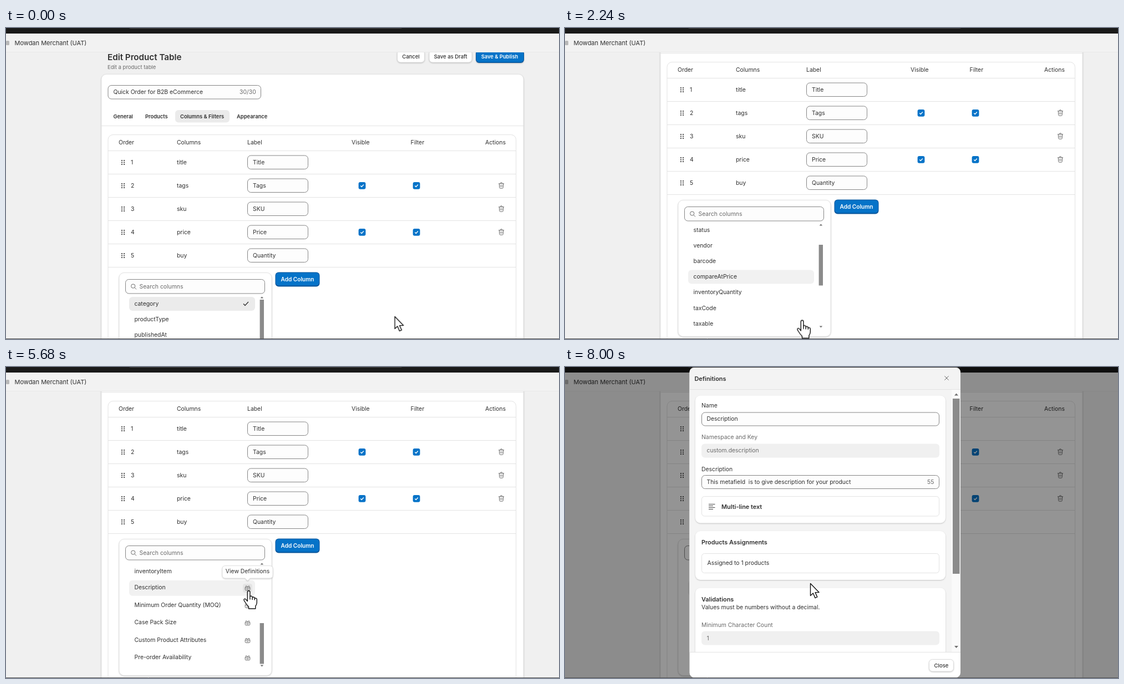
An HTML page that plays this animation: 997x561 px, repeating every 8080 ms.

```html
<!DOCTYPE html>
<html lang="en">
<head>
<meta charset="utf-8">
<title>Edit Product Table</title>
<style>
html, body { margin: 0; width: 100%; height: 100%; overflow: hidden; background: #f0f0f0; }
svg { display: block; width: 997px; height: 561px; }
text {
  font: 400 10.4px Inter, "Open Sans", sans-serif;
  fill: #303030; dominant-baseline: central; white-space: pre;
}
.b { font-weight: 600; font-size: 10.9px; }
.t { font-weight: 600; font-size: 9.4px; }
.m { font-weight: 500; font-size: 9.5px; }
.g { fill: #6a6a6a; }
.w { fill: #fff; }
.mid { text-anchor: middle; }
.card { fill: #fff; stroke: #e4e4e4; }
.line { stroke: #e3e3e3; fill: none; }
.field { fill: #fdfdfd; stroke: #858585; }
.off { fill: #f0f0f0; }
.btn { fill: #fff; stroke: #dcdcdc; }
.blue { fill: #0573c8; }
.edge { fill: #07559a; }
.bar { fill: #8b8b8b; }
.icon { fill: none; stroke: #6a6a6a; }
.shadow { filter: drop-shadow(0 1px 1px #0003); }

/* one loop, in 80 ms steps */
#page, #list, #thumb, #cursor, #arrow, #hand, #hover, #hot, #tip, #shade, #modal {
  animation: 8080ms step-end infinite;
}
#page { animation-name: page; }
#list { animation-name: list; }
#thumb { animation-name: thumb; }
#cursor { animation-name: cursor; }
#arrow { animation-name: arrow; }
#hand { animation-name: hand; }
#hover { animation-name: hover; }
#hot { animation-name: hot; }
#tip { animation-name: tip; }
#shade { animation-name: shade; }
#modal { animation-name: modal; }

@keyframes page {
  0% { transform: translateY(131px); }
  .99% { transform: translateY(104px); }
  1.98% { transform: translateY(48px); }
  2.97% { transform: translateY(10px); }
  3.96%, 100% { transform: none; }
}
@keyframes list {
  0% { transform: none; }
  26.73% { transform: translateY(-32px); }
  27.72% { transform: translateY(-86px); }
  28.71% { transform: translateY(-140px); }
  29.7% { transform: translateY(-186px); }
  30.69% { transform: translateY(-224px); }
  31.68% { transform: translateY(-252px); }
  32.67% { transform: translateY(-271px); }
  33.66%, 100% { transform: translateY(-278.7px); }
}
@keyframes thumb {
  0% { transform: none; }
  26.73% { transform: translateY(12px); }
  27.72% { transform: translateY(32px); }
  28.71% { transform: translateY(52px); }
  29.7% { transform: translateY(69px); }
  30.69% { transform: translateY(83px); }
  31.68% { transform: translateY(93px); }
  32.67% { transform: translateY(100px); }
  33.66%, 100% { transform: translateY(103px); }
}
@keyframes cursor {
  0% { transform: translate(700.5px, 520px); }
  14.85% { transform: translate(678px, 521px); }
  15.84% { transform: translate(612px, 522px); }
  16.83% { transform: translate(534px, 524px); }
  17.82% { transform: translate(472px, 525px); }
  18.81% { transform: translate(436px, 526px); }
  19.8% { transform: translate(422px, 526.5px); }
  20.79% { transform: translate(417px, 526.5px); }
  38.61% { transform: translate(417px, 521px); }
  41.58% { transform: translate(417px, 512px); }
  42.57% { transform: translate(418px, 492px); }
  43.56% { transform: translate(419px, 466px); }
  44.55% { transform: translate(420px, 443px); }
  45.54% { transform: translate(421px, 426px); }
  46.53% { transform: translate(421px, 416px); }
  47.52% { transform: translate(421px, 413px); }
  49.5% { transform: translate(421px, 412px); }
  51.48% { transform: translate(422px, 411px); }
  53.46% { transform: translate(423px, 410px); }
  55.44% { transform: translate(424px, 409px); }
  58.41% { transform: translate(424.5px, 408px); }
  64.35% { transform: translate(425px, 406px); }
  69.3% { transform: translate(426px, 404.5px); }
  70.29% { transform: translate(427px, 403px); }
  99%, 100% { transform: translate(442px, 390px); }
}
@keyframes arrow {
  0% { visibility: visible; }
  18.81% { visibility: hidden; }
  99%, 100% { visibility: visible; }
}
@keyframes hand {
  0% { visibility: hidden; }
  18.81% { visibility: visible; }
  99%, 100% { visibility: hidden; }
}
@keyframes hover {
  0% { visibility: hidden; }
  18.81% { visibility: visible; }
  34.65%, 100% { visibility: hidden; }
}
@keyframes hot {
  0% { visibility: hidden; }
  46.53%, 100% { visibility: visible; }
}
@keyframes tip {
  0% { visibility: hidden; }
  55.44%, 100% { visibility: visible; }
}
@keyframes shade {
  0% { opacity: 0; }
  77.22% { opacity: .05; }
  78.21% { opacity: .16; }
  79.2% { opacity: .26; }
  80.19% { opacity: .34; }
  81.18% { opacity: .39; }
  82.17% { opacity: .41; }
  83.16%, 100% { opacity: .42; }
}
@keyframes modal {
  0% { opacity: 0; transform: translateY(200px); }
  77.22% { opacity: .08; transform: translateY(185px); }
  78.21% { opacity: .3; transform: translateY(150px); }
  79.2% { opacity: .56; transform: translateY(112px); }
  80.19% { opacity: .78; transform: translateY(77px); }
  81.18% { opacity: .91; transform: translateY(40px); }
  82.17% { opacity: .98; transform: translateY(12px); }
  83.16%, 100% { opacity: 1; transform: none; }
}
</style>
</head>
<body>
<svg viewBox="0 0 997 561">
  <defs>
    <clipPath id="view"><rect y="44" width="997" height="517"/></clipPath>
    <clipPath id="listView"><rect x="210" y="353" width="262" height="193"/></clipPath>
    <clipPath id="bodyView"><rect x="224" y="41" width="473" height="473"/></clipPath>
    <g id="grip" fill="#4a4a4a">
      <path d="M-3-4.4h2v2h-2zM1-4.4h2v2h-2zM-3-1h2v2h-2zM1-1h2v2h-2zM-3 2.4h2v2h-2zM1 2.4h2v2h-2z"/>
    </g>
    <g id="check">
      <rect class="blue" x="-6.4" y="-6.4" width="12.8" height="12.8" rx="3"/>
      <path d="M-2.8.2l2 2 3.6-4" fill="none" stroke="#fff" stroke-width="1.3"/>
    </g>
    <g id="bin" class="icon">
      <path d="M-5-3.2h10M-1.8-3.4q0-1.9 1.8-1.9t1.8 1.9M-3.7-3l.4 6.6q.1 1.6 1.6 1.6h3.4q1.5 0 1.6-1.6l.4-6.6M-1.2-.8v3.6M1.2-.8v3.6"/>
    </g>
    <g id="meta" class="icon">
      <path d="M-4.3-.8h8.6v3q0 1.6-1.6 1.6h-5.4q-1.6 0-1.6-1.6zM-4.3-.8q0-1.2 1-1.6v-1.4h2v1.2h2.6v-1.2h2v1.4q1 .4 1 1.6M-2 1.5h4"/>
    </g>
  </defs>

  <rect width="997" height="561" fill="#f0f0f0"/>
  <g clip-path="url(#view)">
    <g id="page">
      <text x="183" y="-79" style="font-size:15.2px;font-weight:600">Edit Product Table</text>
      <text class="g" x="183" y="-61" style="font-size:9.5px">Edit a product table</text>
      <g class="shadow">
        <rect class="btn" x="705.5" y="-91" width="49" height="22" rx="6"/>
        <rect class="btn" x="763" y="-91" width="77" height="22" rx="6"/>
        <rect class="edge" x="847" y="-91" width="87" height="23" rx="6"/>
      </g>
      <rect class="blue" x="848" y="-90" width="85" height="20.5" rx="5"/>
      <text class="m mid" x="730" y="-79.5">Cancel</text>
      <text class="m mid" x="801.5" y="-79.5">Save as Draft</text>
      <text class="t w mid" x="890" y="-79.5">Save &amp; Publish</text>

      <rect class="card shadow" x="172" y="-47.5" width="761" height="800" rx="9"/>
      <rect class="field" x="184" y="-27.5" width="275.5" height="24.5" rx="6"/>
      <text x="193.5" y="-16">Quick Order for B2B eCommerce</text>
      <text class="g" x="421" y="-16">30/30</text>
      <rect x="305" y="17" width="98" height="22.5" rx="6" fill="#ebebeb"/>
      <text class="t" x="193.5" y="28">General</text>
      <text class="t" x="251" y="28">Products</text>
      <text class="t" x="314" y="28">Columns &amp; Filters</text>
      <text class="t" x="416" y="28">Appearance</text>
      <path class="line" d="M172 45.5h761"/>
      <rect class="line" x="184" y="61.5" width="735.5" height="700" rx="9"/>
      <g id="rows"></g>

      <rect class="card shadow" x="204" y="310.5" width="275" height="246" rx="9"/>
      <rect class="field" x="215.5" y="322.5" width="251" height="25.5" rx="6"/>
      <g class="icon"><circle cx="229.2" cy="334.6" r="3.6"/><path d="M232 337.4l3 3"/></g>
      <text class="g" x="240.5" y="335">Search columns</text>
      <rect class="edge" x="485.5" y="309.5" width="80" height="26" rx="6"/>
      <rect class="blue" x="486.5" y="310.5" width="78" height="23" rx="5"/>
      <text class="t w mid" x="525.5" y="322" style="font-size:10.1px">Add Column</text>
      <g clip-path="url(#listView)">
        <g id="list"></g>
      </g>
      <path d="M458.6 356.5h5.6l-2.8-3zM458.6 537.5h5.6l-2.8 3z" fill="#707070"/>
      <rect id="thumb" class="bar" x="457.6" y="359" width="7.4" height="73.5"/>
      <g id="tip">
        <path class="shadow" d="M396 358.5h79q6 0 6 6v10.500q0 6-6 6h-35l-4.500 4.500-4.500-4.500h-35q-6 0-6-6v-10.500q0-6 6-6z" fill="#fff" stroke="#e2e2e2"/>
        <text class="mid" x="435.5" y="368.500">View Definitions</text>
      </g>
    </g>
  </g>

  <rect y="10" width="997" height="34" fill="#f2f2f2"/>
  <path d="M0 43.500h997" stroke="#e8e8e8"/>
  <rect width="997" height="10" fill="#1a1a1a"/>
  <rect x="219" y="-20" width="498" height="20.500" rx="6" fill="#242424" stroke="#444"/>
  <rect y="23" width="6" height="8" rx="1.500" fill="#b8b8b8"/>
  <text x="15.500" y="27" style="font-size:11px">Mowdan Merchant (UAT)</text>
  <rect id="shade" width="997" height="561"/>

  <g id="modal">
    <rect x="224.500" y="1" width="488.500" height="559.500" rx="9" fill="#fff"/>
    <path d="M224.500 41V10q0-9 9-9H704q9 0 9 9V41z" fill="#f3f3f3"/>
    <rect x="224.500" y="41" width="472.500" height="473" fill="#f4f4f4"/>
    <rect x="697" y="41" width="16" height="473" fill="#fafafa"/>
    <path class="line" d="M224.500 40.500H713M224.500 514.500H713"/>
    <text class="b" x="233.500" y="20.500">Definitions</text>
    <path class="icon" d="M684.300 16.300l7.400 7.400m0-7.400l-7.400 7.400"/>
    <g clip-path="url(#bodyView)">
      <g class="shadow">
        <rect class="w" x="235" y="51.500" width="451" height="230" rx="9"/>
        <rect class="w" x="235" y="296" width="451" height="88" rx="9"/>
        <rect class="w" x="235" y="398.500" width="451" height="180" rx="9"/>
      </g>
      <text x="246" y="69.500">Name</text>
      <rect class="field" x="246.500" y="82" width="428" height="24" rx="6"/>
      <text x="255.500" y="93.500">Description</text>
      <text class="g" x="246" y="126.500">Namespace and Key</text>
      <rect class="off" x="246" y="138.500" width="429" height="25" rx="6"/>
      <text class="g" x="255.500" y="150.500">custom.description</text>
      <text x="246" y="184">Description</text>
      <rect class="field" x="246.500" y="195.500" width="428" height="24" rx="6"/>
      <text x="255.500" y="207.500">This metafield  is to give description for your product</text>
      <text class="g" x="653" y="207.500">55</text>
      <rect class="line" x="246.500" y="233.500" width="428" height="35.500" rx="5"/>
      <path class="icon" d="M259 247.500h11.500M259 250.500h8M259 253.500h11.500M259 256.500h8" style="stroke:#444"/>
      <text class="b" x="282" y="251.500">Multi-line text</text>
      <text class="b" x="246" y="316">Products Assignments</text>
      <rect class="line" x="246.500" y="336.500" width="428" height="35" rx="5"/>
      <text x="256.500" y="353.500">Assigned to 1 products</text>
      <text class="b" x="246" y="418.500">Validations</text>
      <text x="246" y="433.500">Values must be numbers without a decimal.</text>
      <text class="g" x="246" y="465">Minimum Character Count</text>
      <rect class="off" x="246" y="476.500" width="429" height="25" rx="6"/>
      <text class="g" x="255.500" y="489">1</text>
    </g>
    <path d="M702 51.500h7l-3.500-4zM702 503h7l-3.500 4z" fill="#707070"/>
    <rect class="bar" x="699" y="57" width="12.500" height="316"/>
    <rect class="btn shadow" x="656.500" y="527.500" width="44" height="21.500" rx="6"/>
    <text class="m mid" x="678.500" y="538">Close</text>
  </g>
  <path d="M0 560.500h997" stroke="#555"/>

  <g id="cursor" fill="#fff" stroke="#111" stroke-width="1.400" stroke-linejoin="round">
    <path id="arrow" d="M.500.500V22.500L5.300 18l3.700 8.600 3.800-1.700-3.700-8.300H16z"/>
    <g id="hand">
      <path d="M8.300 3a2.300 2.300 0 0 1 4.600 0V10.500q4-1 4.200 1.700 3.900-.8 4.200 1.800 3.900-.5 4 2.500V22q0 3-2.500 6.500V33H10.500V29.500Q6.500 25.500 3 19.500 1 16.500 2.500 15.500q2.200-1.200 4.200 2L8.300 19.500z"/>
      <path d="M12.900 10.500v6M17.100 12.200v4.800M21.300 14v3.500" fill="none"/>
    </g>
  </g>
</svg>
<script>
const $ = id => document.getElementById(id);
const label = (x, y, s) => `<text x="${x}" y="${y}">${s}</text>`;
const use = (id, x, y) => `<use href="#${id}" x="${x}" y="${y}"/>`;
const pill = (y, h, fill, id = "") =>
  `<rect id="${id}" x="222" y="${y - h / 2}" width="227" height="${h}" rx="6" fill="${fill}"/>`;

// name, label, has checkboxes, can be deleted
const rows = [
  ["title", "Title", 0, 0], ["tags", "Tags", 1, 1], ["sku", "SKU", 0, 1],
  ["price", "Price", 1, 1], ["buy", "Quantity", 0, 0]
];
const heads = { Order: 203, Columns: 308, Label: 435, Visible: 623, Filter: 729.5, Actions: 864 };

$("rows").innerHTML =
  Object.entries(heads).map(([s, x]) => label(x, 75.5, s)).join("") +
  `<path class="line" d="M184 90.500h735.500"/>` +
  rows.map(([name, text, checks, del], i) => {
    const y = 111 + 42 * i;
    return use("grip", 211, y + .5) + label(225, y, i + 1) + label(308, y, name) +
      `<rect class="field" x="435.500" y="${y - 12}" width="109" height="24.500" rx="6"/>` +
      label(445, y, text) +
      (checks ? use("check", 642, y + .3) + use("check", 740, y + .3) : "") +
      (del ? use("bin", 893, y) : "") +
      `<path class="line" d="M184 ${y + 21.5}h735.500"/>`;
  }).join("");

const plain = ["category", "productType", "publishedAt", "status", "vendor", "barcode",
  "compareAtPrice", "inventoryQuantity", "taxCode", "taxable", "inventoryItem"];
const custom = ["Description", "Minimum Order Quantity (MOQ)", "Case Pack Size",
  "Custom Product Attributes", "Pre-order Availability"];
const top1 = 366.5, step1 = 28.07, top2 = 676.7, step2 = 31.5;

$("list").innerHTML =
  pill(top1, 25, "#ebebeb") +
  pill(top1 + 6 * step1, 25, "#f1f1f1", "hover") +
  `<g id="hot">${pill(top2 + .8, 28, "#f1f1f1")}
    <rect x="427" y="${top2 - 7}" width="17" height="16" rx="4" fill="#e4e4e4"/></g>` +
  `<path d="M428 366.500l3 3 6-6.500" fill="none" stroke="#303030" stroke-width="1.300"/>` +
  plain.map((s, i) => label(231.5, top1 + i * step1, s)).join("") +
  custom.map((s, i) => label(231.5, top2 + i * step2, s) + use("meta", 435.5, top2 + 1 + i * step2)).join("");
</script>
</body>
</html>
```
